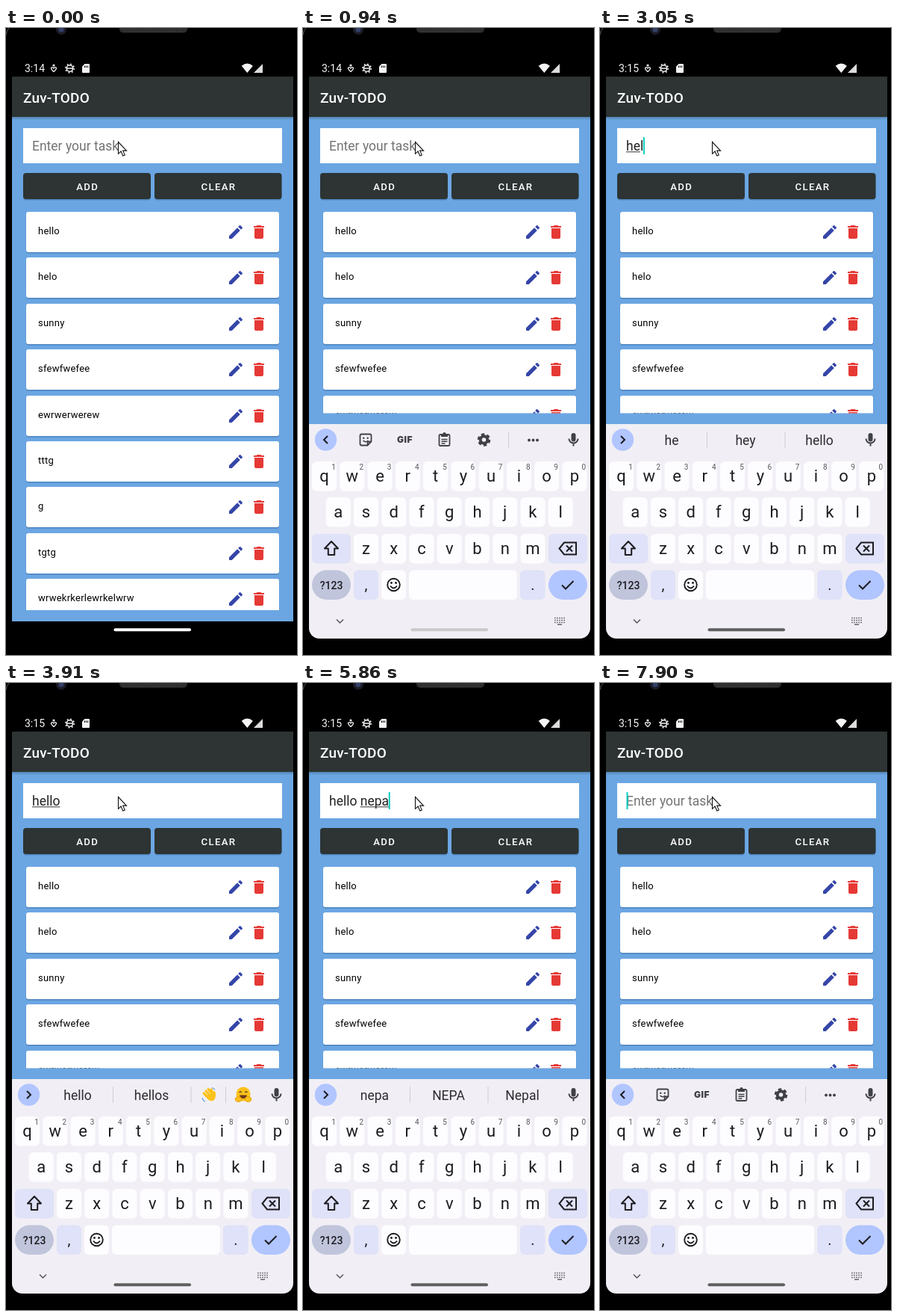
Write an HTML page that moves like this. It is 390 by 839 pixels and loops after 8 s.

```html
<!DOCTYPE html>
<html lang="en">
<head>
<meta charset="utf-8">
<title>To-do list</title>
<style>
html, body { margin: 0; width: 100%; height: 100%; overflow: hidden; background: #000; }
svg { display: block; width: 100%; height: 100%; font-family: Roboto, sans-serif; }
text { white-space: pre; }
</style>
</head>
<body>
<svg id="stage" viewBox="0 0 390 839"></svg>
<script>
const LOOP = 8000;
const DARK = '#2d3433', BLUE = '#6ba6e3', INK = '#1c1b20', ICON = '#404146';
const INPUT_X = 35, INPUT_SIZE = 17.5;

const rect = (x, y, w, h, fill, r = 0, more = '') =>
  `<rect x="${x}" y="${y}" width="${w}" height="${h}" rx="${r}" fill="${fill}" ${more}/>`;
const circle = (x, y, r, fill, more = '') => `<circle cx="${x}" cy="${y}" r="${r}" fill="${fill}" ${more}/>`;
const label = (x, y, size, fill, str, more = '') =>
  `<text x="${x}" y="${y}" font-size="${size}" fill="${fill}" ${more}>${str}</text>`;
const mid = (x, y, size, fill, str, more = '') => label(x, y, size, fill, str, 'text-anchor="middle" ' + more);
const fillPath = (d, fill, more = '') => `<path d="${d}" fill="${fill}" ${more}/>`;
const line = (d, color, w = 1.8, more = '') =>
  `<path d="${d}" fill="none" stroke="${color}" stroke-width="${w}" ${more}/>`;
const group = (body, more) => `<g ${more}>${body}</g>`;
const move = (x, y, body, s = 1) => group(body, `transform="translate(${x} ${y}) scale(${s})"`);

const PENCIL = 'M3 17.25V21h3.75L17.81 9.94l-3.75-3.75zM20.71 7.04a1 1 0 0 0 0-1.41l-2.34-2.34a1 1 0 0 0-1.41 0l-1.83 1.83 3.75 3.75z';
const BIN = 'M6 19c0 1.1.9 2 2 2h8c1.1 0 2-.9 2-2V7H6zM19 4h-3.5l-1-1h-5l-1 1H5v2h14z';

function phone() {
  return line('M0 9Q1 3 4 0', '#55585a', 1) +
    circle(74, 2, 7, '#1b1c26') + circle(74, 2, 3.5, '#33406b') +
    rect(152, -6, 91, 12.5, '#2b2b2b', 5) +
    line('M155 2H240M157 4.5H238', '#444', 1, 'stroke-dasharray="1.5 1.5"');
}

function statusBar() {
  const w = '#f4f4f4';
  const health = circle(64, 50, 1.6, w) + line('M60.5 53.5q0 2 3.5 5q3.5-3 3.5-5q-2-2-3.5.5q-1.5-2.5-3.5-.5z', w, 1.3);
  const bug = circle(85.5, 54, 4.2, 'none', `stroke="${w}" stroke-width="1.6"`) +
    circle(85.5, 54, 5.8, 'none', `stroke="${w}" stroke-width="1.6" stroke-dasharray="1.8 2.75"`) +
    line('M82 54h7', w, 1.5);
  const card = fillPath('M105.5 48h5.5q1 0 1 1v10q0 1-1 1h-8q-1 0-1-1v-7.5z', w) +
    line('M105.5 50.5v2.5M107.6 50.5v2.5M109.7 50.5v2.5', '#000', 1);
  const signal = fillPath('M323.3 60l-7.6-9.3q7.6-6.4 15.2 0z', w) + fillPath('M332 60h12v-12z', w, 'opacity=".9"');
  return `<text id="clock" x="25" y="59" font-size="14" fill="${w}"></text>` + health + bug + card + signal;
}

function taskCard(name, i) {
  const y = Math.round(246 + i * 61.4);
  return rect(27, y + 1, 339, 55, '#2f5f96', 3.5, 'opacity=".28"') +
    rect(26.5, y, 340, 55, '#2f5f96', 3.5, 'opacity=".25"') +
    rect(27, y, 339, 54, '#fff', 3) +
    label(43, y + 29.6, 13, '#000', name, 'letter-spacing=".23"') +
    move(296, y + 15, fillPath(PENCIL, '#3546a8')) +
    move(327, y + 15, fillPath(BIN, '#e53935'));
}

function app() {
  const tasks = ['hello', 'helo', 'sunny', 'sfewfwefee', 'ewrwerwerew', 'tttg', 'g', 'tgtg', 'wrwekrkerlewrkelwrw'];
  const button = (x, w, str) => rect(x, 195.5, w, 35, '#2f5f96', 4, 'opacity=".45"') +
    rect(x, 194, w, 35, DARK, 4) +
    mid(x + w / 2 + .7, 216.5, 13.2, '#fff', str, 'font-weight="500" letter-spacing="1.3"');
  return rect(8, 65, 377, 729, BLUE) +
    rect(8, 119, 377, 2, '#33506e', 0, 'opacity=".3"') + rect(8, 121, 377, 2, '#33506e', 0, 'opacity=".12"') +
    rect(8, 65, 377, 54, DARK) +
    label(23, 99.5, 19, '#fff', 'Zuv-TODO', 'font-weight="500" letter-spacing=".2"') +
    rect(23, 134, 347, 47, '#fff') +
    `<text id="entry" x="${INPUT_X}" y="164" font-size="${INPUT_SIZE}"></text>` +
    rect(0, 165.3, 0, 1, '#333', 0, 'id="underline"') +
    rect(0, 146, 2, 23, '#0bcdbb', 0, 'id="caret"') +
    button(23, 171, 'ADD') + button(199, 170.5, 'CLEAR') +
    group(tasks.map(taskCard).join(''), 'clip-path="url(#listClip)"');
}

const mic = () => move(362.5, 551,
  rect(-3, -9, 6, 11.5, ICON, 3) + line('M-6-1.5a6 6 0 0 0 12 0M0 4.5V8.5', ICON, 2));

function tools() {
  const sticker = line('M-5.5-7.5h11q2 0 2 2V2.5L2.5 7.5h-8q-2 0-2-2v-11q0-2 2-2zM7 2.5H4.5q-2 0-2 2V7', ICON) +
    circle(-2.7, -2.2, 1.2, ICON) + circle(2.7, -2.2, 1.2, ICON) + line('M-3.5 1q3.5 3.5 7 0', ICON, 1.5);
  const clip = rect(-7, -7, 14, 15, 'none', 1.5, `stroke="${ICON}" stroke-width="1.8"`) +
    rect(-4.5, -8, 9, 4, ICON) + circle(0, -8, 2, ICON) + line('M-4-.5h8M-4 2.2h8M-4 5h5', ICON, 1.4);
  const gear = circle(0, 0, 4.8, 'none', `stroke="${ICON}" stroke-width="4"`) +
    circle(0, 0, 7.4, 'none', `stroke="${ICON}" stroke-width="2.8" stroke-dasharray="4.4 3.35"`);
  return line('M33 546l-5 5 5 5', INK, 2) + move(84, 551, sticker) +
    mid(136.5, 555.3, 12, ICON, 'GIF', 'font-weight="900" letter-spacing=".5" style="font-family:Inter,sans-serif"') +
    move(189.5, 551, clip) + move(242.5, 551, gear) + rect(275, 540, 1, 22, '#cfced6') +
    [303, 308.5, 314].map(x => circle(x, 551.5, 1.9, ICON)).join('');
}

function emojis() {
  const skin = '#fcc21b', shade = '#e59600';
  const hand = line('M-4-5L2 2M-1-7.5L5 0M3-7L7 1M-7-2L0 5', skin, 3.2, 'stroke-linecap="round"') +
    fillPath('M-3 1L5-2L7-5Q9-5 9 0Q9 8 3 8.5Q0 8-3 4z', skin) +
    line('M-9 4q1 4 4 5M4-9.5q3 1 4 3', '#6aa7d8', 1.2);
  const face = circle(0, -1, 9.5, skin) + line('M-5.5-3q1.7-2.5 3.4 0M2.1-3q1.7-2.5 3.4 0', '#6b4a1c', 1.4) +
    fillPath('M-5 0.5H5Q4 5 0 5T-5 .5z', '#6b3a1c') +
    [-1, 1].map(s => `<ellipse cx="${s * 6.5}" cy="6" rx="4.2" ry="3.3" fill="${skin}" stroke="${shade}"/>`).join('');
  return rect(294, 540, 1, 22, '#cfced6') + move(272, 551, hand) + move(318, 551, face);
}

function suggestions() {
  return line('M28 546l5 5-5 5', INK, 2) +
    group(rect(143, 540, 1, 22, '#cfced6') + rect(247.5, 540, 1, 22, '#cfced6'), 'id="dividers"') +
    [96, 195, 294].map((x, i) => mid(x, 558, INPUT_SIZE, '#2c2b30', '', `id="word${i}"`)).join('') +
    group(emojis(), 'id="emojis"');
}

function keyboard() {
  const pitch = 37.25, tint = '#dfe2f8', key = '#fdfcff';
  const cap = (x, y, w, fill, r = 6) => rect(x, y, w, 39.5, fill, r);
  const row = (str, x, y, hints) => [...str].map((c, i) => {
    const cx = x + i * pitch;
    return cap(cx - 16.5, y, 33, key) + mid(cx, y + 26.5, 22, INK, c) +
      (hints ? mid(cx + 12.5, y + 11, 10, '#55555c', (i + 1) % 10) : '');
  }).join('');
  const smile = circle(0, 0, 8.3, 'none', `stroke="${INK}" stroke-width="1.9"`) +
    circle(-3, -2.5, 1.4, INK) + circle(3, -2.5, 1.4, INK) + line('M-4.5 1.5q4.5 6 9 0', INK);
  const dots = [0, 1, 2].map(r => line(`M337 ${789.5 + r * 3}h14`, '#66666c', 1.7, 'stroke-dasharray="1.7 1.35"')).join('');
  return rect(8, 530, 377, 309, '#f1eff5') +
    circle(30.5, 551, 14.7, '#b1c5ff') + group(tools(), 'id="tools"') + group(suggestions(), 'id="suggest"') + mic() +
    row('qwertyuiop', 28.6, 580, true) + row('asdfghjkl', 47.2, 628) + row('zxcvbnm', 84.5, 677) +
    cap(12, 677, 52, tint) + line('M38 687l-9 9.5h4.8v8.5h8.4v-8.5h4.8z', INK, 2, 'stroke-linejoin="round"') +
    cap(329, 677, 52, tint) + line('M350 688.5h16v16h-16l-6.5-8zM353 692.5l8 8M361 692.5l-8 8', INK, 2) +
    cap(12, 725.5, 52, '#c0c5dc', 19.7) + mid(38, 750.5, 14, INK, '?123', 'font-weight="500"') +
    cap(68, 725.5, 33, tint) + mid(84.5, 752, 20, INK, ',') +
    cap(105, 725.5, 33, key) + move(121.5, 745, smile) +
    cap(142, 725.5, 145, key) +
    cap(291, 725.5, 33.5, tint) + mid(308, 752, 20, INK, '.') +
    cap(329, 725.5, 52, '#b1c5ff', 19.7) + line('M347 745.5l5 5 10.5-10.5', INK, 2) +
    line('M45 791.5l4.5 4.5 4.5-4.5', '#55555c', 1.5) + dots + line('M341 798.3h6', '#66666c', 1.5);
}

const svg = document.getElementById('stage');
svg.innerHTML = `<defs>
  <clipPath id="listClip"><rect id="listBox" x="20" y="240" width="352"/></clipPath>
  <clipPath id="boardClip"><path d="M8 530H385V803a14 14 0 0 1-14 14H22a14 14 0 0 1-14-14z"/></clipPath>
  </defs>` + phone() + statusBar() + app() +
  group(rect(8, 530, 377, 264, '#fdfdfd') + rect(8, 794, 377, 30, '#000') + group(keyboard(), 'id="keys"'),
    'id="board" clip-path="url(#boardClip)"') +
  rect(144.5, 803.3, 103.5, 4, '#fff', 2, 'id="handle"') +
  fillPath('M150.5 152.5v15.8l3.6-3.3 2.6 6 2.6-1.1-2.6-5.8h4.8z', '#fff', 'stroke="#111" stroke-width="1.1"');

const el = {};
svg.querySelectorAll('[id]').forEach(n => el[n.id] = n);
const show = (node, on) => node.setAttribute('display', on ? 'inline' : 'none');
const set = (node, attrs) => { for (const k in attrs) node.setAttribute(k, attrs[k]); };

const pen = document.createElement('canvas').getContext('2d');
const width = str => {
  pen.font = `${INPUT_SIZE}px Roboto, sans-serif`;
  return pen.measureText(str).width;
};

// Each track holds [start time, value]; a value stays until the next start.
const at = (track, t) => track.reduce((v, [start, next]) => t >= start ? next : v, track[0][1]);

const typed = [[0, ''], [2140, 'h'], [2680, 'he'], [3050, 'hel'], [3170, 'hell'], [3290, 'hello'], [4820, 'hello '],
  [4970, 'hello n'], [5230, 'hello ne'], [5470, 'hello nep'], [5740, 'hello nepa'], [5980, 'hello nepal'],
  [6890, 'hello nepa'], [7390, 'hello ne'], [7510, 'hello '], [7640, 'hel'], [7760, '']];
const marked = [[0, ''], [2140, 'h'], [2930, 'he'], [3170, 'hel'], [3410, 'hello'], [4970, ''], [5090, 'n'],
  [5350, 'ne'], [5620, 'nep'], [5860, 'nepa'], [5980, 'nepal'], [6890, 'nepa'], [7390, 'ne'], [7510, ''],
  [7640, 'hel'], [7760, '']];
// Two words leave the third slot to the emojis.
const words = [[0, ''], [2140, 'h hello'], [2930, 'he hey hello'], [3170, 'hel hello help'], [3410, 'hello hellos'],
  [5090, 'n no'], [5230, 'n no nice'], [5350, 'ne new never'], [5620, 'nep Nepal nephew'], [5860, 'nepa NEPA Nepal'],
  [5980, 'nepal Nepal nepali'], [6890, 'nepa NEPA Nepal'], [7390, 'ne new never'], [7640, 'hel hello help'], [7760, '']];
const blink = [[0, 0], [120, 1], [670, 0], [1180, 1], [1690, 0], [2140, 1], [3910, 0], [4440, 1], [6380, 0], [6890, 1]];
const slide = [[0, [287, 0]], [260, [161, .31]], [410, [22, .87]], [530, [0, 1]]];
const darken = [670, 940, 1180, 1450, 1690, 1990];

function draw(t) {
  const text = at(typed, t), mark = at(marked, t);
  el.clock.textContent = t < 2430 ? '3:14' : '3:15';

  el.entry.textContent = text || 'Enter your task';
  set(el.entry, { fill: text ? '#222' : '#737373' });
  set(el.caret, { x: INPUT_X + Math.max(.5, width(text) - .3) });
  show(el.caret, at(blink, t));
  const from = mark ? text.lastIndexOf(' ' + mark) + 1 : 0;
  const lead = mark && text.trim() !== mark ? width(text.slice(0, from)) : 0;
  set(el.underline, { x: INPUT_X + lead, width: width(mark) });

  const open = t >= 260, [dy, alpha] = at(slide, t);
  show(el.board, open);
  set(el.keys, { transform: `translate(0 ${dy})`, opacity: alpha });
  set(el.listBox, { height: open ? 275.5 : 539 });

  const suggesting = t >= 2140 && t < 7900;
  show(el.tools, !suggesting);
  show(el.suggest, suggesting);
  const list = at(words, t).split(' ');
  for (let i = 0; i < 3; i++) el['word' + i].textContent = list[i] || '';
  show(el.dividers, list.length > 1);
  show(el.emojis, list.length === 2);

  const fade = darken.filter(s => t >= s).length / darken.length;
  const grey = Math.round(255 - 160 * fade);
  set(el.handle, { fill: `rgb(${grey},${grey},${grey})` });
}

function tick() {
  draw(performance.now() % LOOP);
  requestAnimationFrame(tick);
}
tick();
</script>
</body>
</html>
```
